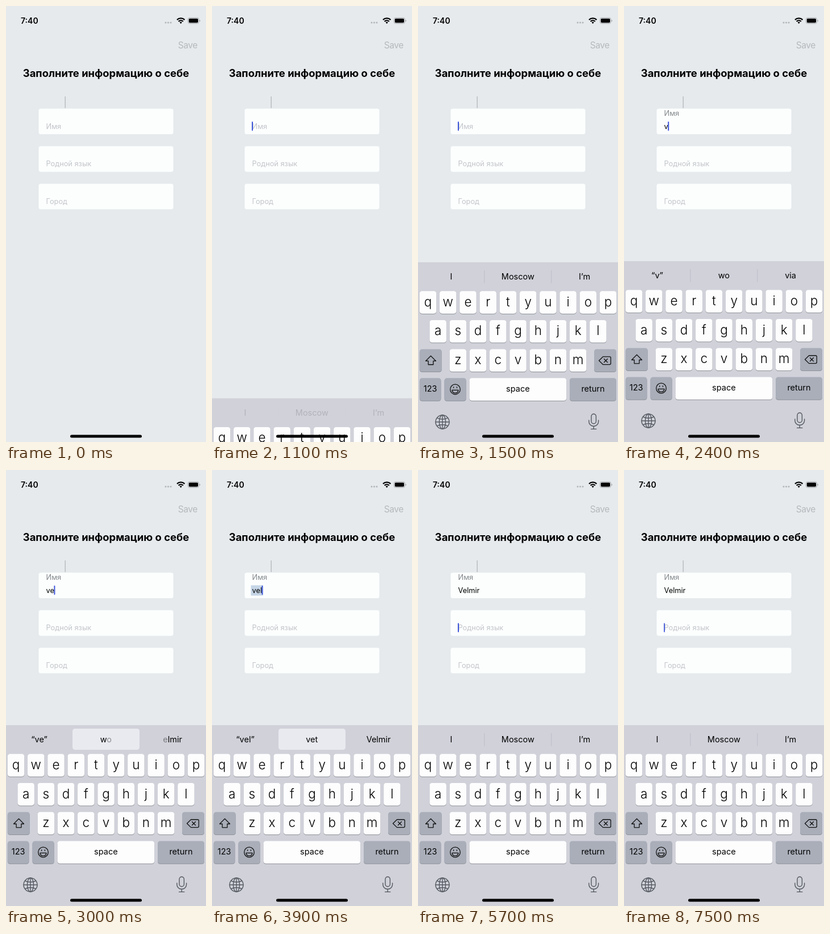
Write an HTML page that moves like this. It is 352x762 px and loops after 8000 ms.

```html
<!DOCTYPE html>
<html lang="ru">
<head>
<meta charset="utf-8">
<title>Profile form</title>
<style>
  html, body { margin: 0; width: 100%; height: 100%; overflow: hidden; background: #e6eaed; }
  svg { display: block; font-family: Inter, "Open Sans", sans-serif; }
  .mid { text-anchor: middle; }
  .field { fill: #fcfefe; stroke: #dfe4e7; stroke-width: .6; }
  .input { font-size: 12.8px; }
  .hint { fill: #c2c5c9; }
  .letter { font-size: 22.5px; font-weight: 300; }
  .word { font-size: 14.5px; }
  .line { fill: none; stroke: #111; stroke-width: 1.3; stroke-linejoin: round; stroke-linecap: round; }
  .tool { stroke: #555961; stroke-width: 1.4; }
</style>
</head>
<body>
<svg width="352" height="762" viewBox="0 0 352 762">
  <rect width="352" height="762" fill="#e6eaed"/>
  <text x="26" y="31" font-size="14" font-weight="600">7:40</text>
  <path d="M281 29h13.5" stroke="#b4b8bc" stroke-width="3.2" stroke-linecap="round" stroke-dasharray="0 4.5"/>
  <g fill="none" stroke="#000" stroke-width="2.3">
    <path d="M301 24.1a9.7 9.7 0 0 1 13.4 0M303.6 27a6 6 0 0 1 8.2 0"/>
    <path d="M307.7 31l-2.1-2.2a3 3 0 0 1 4.2 0z" fill="#000" stroke="none"/>
  </g>
  <rect x="320.4" y="20.6" width="19" height="10" rx="2.8" fill="none" stroke="#9b9fa2" stroke-width=".9"/>
  <rect x="321.8" y="22" width="16.2" height="7.2" rx="1.6"/>
  <path d="M340.6 24v3.4q1.4-.4 1.4-1.7t-1.4-1.7z" fill="#9b9fa2"/>
  <text x="337" y="73.5" font-size="15.5" letter-spacing="-.4" text-anchor="end" fill="#b5b9bc">Save</text>
  <text class="mid" x="176" y="124" font-size="18.4" font-weight="700">Заполните информацию о себе</text>
  <path d="M104.2 158v20.5" stroke="#aeb2b5" stroke-width="1.2"/>
  <g id="fields"></g>
  <rect id="mark" x="68.5" y="201.5" height="18" fill="#c5d5e6"/>
  <text id="label" class="input" x="70.5">Имя</text>
  <text id="value" class="input" x="70.5" y="214.5"></text>
  <rect id="caret" width="2" height="16" rx=".8" fill="#3f57db"/>
  <g id="keyboard">
    <rect width="352" height="320" fill="#d0d1d9"/>
    <rect id="glow" y="6" width="118" height="37" rx="4.5" fill="#e9eaf0"/>
    <g id="bar"></g>
    <g id="keys"></g>
    <path class="line" d="M22.5 163.5l9 9h-4.6v6.3h-8.8v-6.3h-4.6z"/>
    <path class="line" d="M325.5 165h11.8q2 0 2 2v9.6q0 2-2 2h-11.8l-7-6.8zM327.5 168.8l6 6m0-6l-6 6"/>
    <g class="line">
      <circle cx="65.5" cy="222" r="8.8"/>
      <path d="M60 223.4h11q-.6 5-5.5 5t-5.5-5zM62.6 218v1.4M68.4 218v1.4"/>
    </g>
    <g class="line tool">
      <circle cx="43" cy="279" r="12"/>
      <ellipse cx="43" cy="279" rx="5.6" ry="12"/>
      <path d="M43 267v24M31 279h24M33.5 272q9.5 4.5 19 0M33.5 286q9.5-4.5 19 0"/>
      <rect x="305" y="265" width="8.4" height="17" rx="4.2"/>
      <path d="M300.8 276v2.5a8.4 8 0 0 0 16.8 0v-2.5M309.2 286.6v4.8M304.6 291.4h9.2"/>
    </g>
  </g>
  <rect x="113" y="749.5" width="126" height="5" rx="2.5"/>
</svg>
<script>
const $ = id => document.getElementById(id);
const clamp = v => Math.max(0, Math.min(1, v));
const set = (id, attrs) => {
  for (const name in attrs) $(id).setAttribute(name, attrs[name]);
};

// Form fields
['', 'Родной язык', 'Город'].forEach((hint, i) => {
  const y = 179 + i * 65.6;
  $('fields').innerHTML += `<rect class="field" x="57" y="${y}" width="238" height="45.6" rx="4"/>
    <text class="input hint" x="70.5" y="${y + 35.3}">${hint}</text>`;
});

// Keyboard
const rowY = row => 50.3 + row * 50.7;
function key(x, row, width, text = '', style = 'letter', fill = '#fdfdfe') {
  const y = rowY(row);
  const baseline = y + (style === 'letter' ? 26.5 : 23.7);
  $('keys').innerHTML += `<rect x="${x}" y="${y + 1}" width="${width}" height="39.4" rx="4.4" fill="#8f9299"/>
    <rect x="${x}" y="${y}" width="${width}" height="39.4" rx="4.4" fill="${fill}"/>
    <text class="mid ${style}" x="${x + width / 2}" y="${baseline}">${text}</text>`;
}
['qwertyuiop', 'asdfghjkl', 'zxcvbnm'].forEach((letters, row) => {
  const left = [2.8, 20.4, 55.6][row];
  [...letters].forEach((letter, i) => key(left + i * 35.22, row, 29.5, letter));
});
const dark = '#a9aeb9';
key(2.8, 2, 39, '', 'word', dark);
key(310, 2, 39, '', 'word', dark);
key(2.8, 3, 37.7, '123', 'word', dark);
key(46.5, 3, 38.3, '', 'word', dark);
key(90.5, 3, 170.7, 'space', 'word');
key(267, 3, 82, 'return', 'word', dark);

// Time, suggestions ("~" dims the next letter), highlighted slot
const idle = ['I', 'Moscow', 'I’m'];
const bars = [
  [0, idle, -1],
  [2000, ['“v~”', '~w~o', '~v~ia'], -1],
  [2100, ['“v”', 'wo', 'via'], -1],
  [2900, ['“v~e~”', 'w~o', '~vi~r'], 1],
  [3000, ['“ve”', 'w~o', '~elmir'], 1],
  [3100, ['“ve”', 'we', 'Velmir'], 1],
  [3800, ['“ve~l~”', '~v~e~t', 'Velmir'], 1],
  [3900, ['“vel”', 'vet', 'Velmir'], 1],
  [4500, ['“vel”', 'vet', 'Velmir'], 2],
  [4600, ['~a~n~d', '~i~s', '~w~a~s'], -1],
  [4700, ['and', 'is', 'was'], -1],
  [5500, ['~I', '~M~o~s~c~o~w', '~I~’~m'], -1],
  [5600, idle, -1],
];
const typing = [[0, ''], [2000, 'v'], [2900, 've'], [3800, 'vel'], [4600, 'Velmir']];
const activity = [1000, 2000, 2900, 3800, 4600, 5500];
const latest = (list, t) => list.filter(item => item[0] <= t).pop();

const dim = text => text.replace(/~(.)/g, '<tspan opacity=".4">$1</tspan>');

function drawBar(t) {
  const [, words, active] = latest(bars, t);
  const lines = active < 0 ? '<path d="M116.8 14v22.5M234.8 14v22.5" stroke="#bcbec6"/>' : '';
  $('bar').innerHTML = lines + words.map((text, i) =>
    `<text class="mid word" x="${58.5 + i * 117.3}" y="30">${dim(text)}</text>`).join('');
  set('bar', { opacity: clamp((t - 1050) / 350) });
  set('glow', { x: active === 2 ? 235 : 117, opacity: active < 0 ? 0 : 1 });
}

function caretOpacity(age) {
  if (age <= 500) return 1;
  const fromDark = Math.abs((age - 770 + 1425) % 950 - 475);
  return clamp((fromDark - 100) / 200);
}

function drawForm(t) {
  const rise = clamp((t - 1900) / 300);
  const ease = rise * (2 - rise);
  set('label', { y: 214.5 - 22.5 * ease, fill: rise ? '#85898c' : '#c2c5c9' });

  $('value').textContent = latest(typing, t)[1];
  const width = $('value').getComputedTextLength();
  set('mark', { width: width + 4, opacity: t >= 3900 && t < 4600 ? 1 : 0 });

  const start = activity.filter(time => time <= t).pop();
  const second = t >= 5500;
  set('caret', {
    x: second ? 70 : 70 + width + (t >= 4600 ? 4 : 0),
    y: second ? 267.5 : 202,
    opacity: start ? caretOpacity(t - start) : 0,
  });
}

function frame(now) {
  const t = Math.floor(now % 8000 / 100) * 100;
  // Critically damped slide
  const s = Math.max(0, t - 1040) * 0.01565;
  const hidden = (1 + s) * Math.exp(-s);
  set('keyboard', { transform: `translate(0 ${446 + 316 * hidden})` });
  drawBar(t);
  drawForm(t);
  requestAnimationFrame(frame);
}
frame(0);
</script>
</body>
</html>
```
